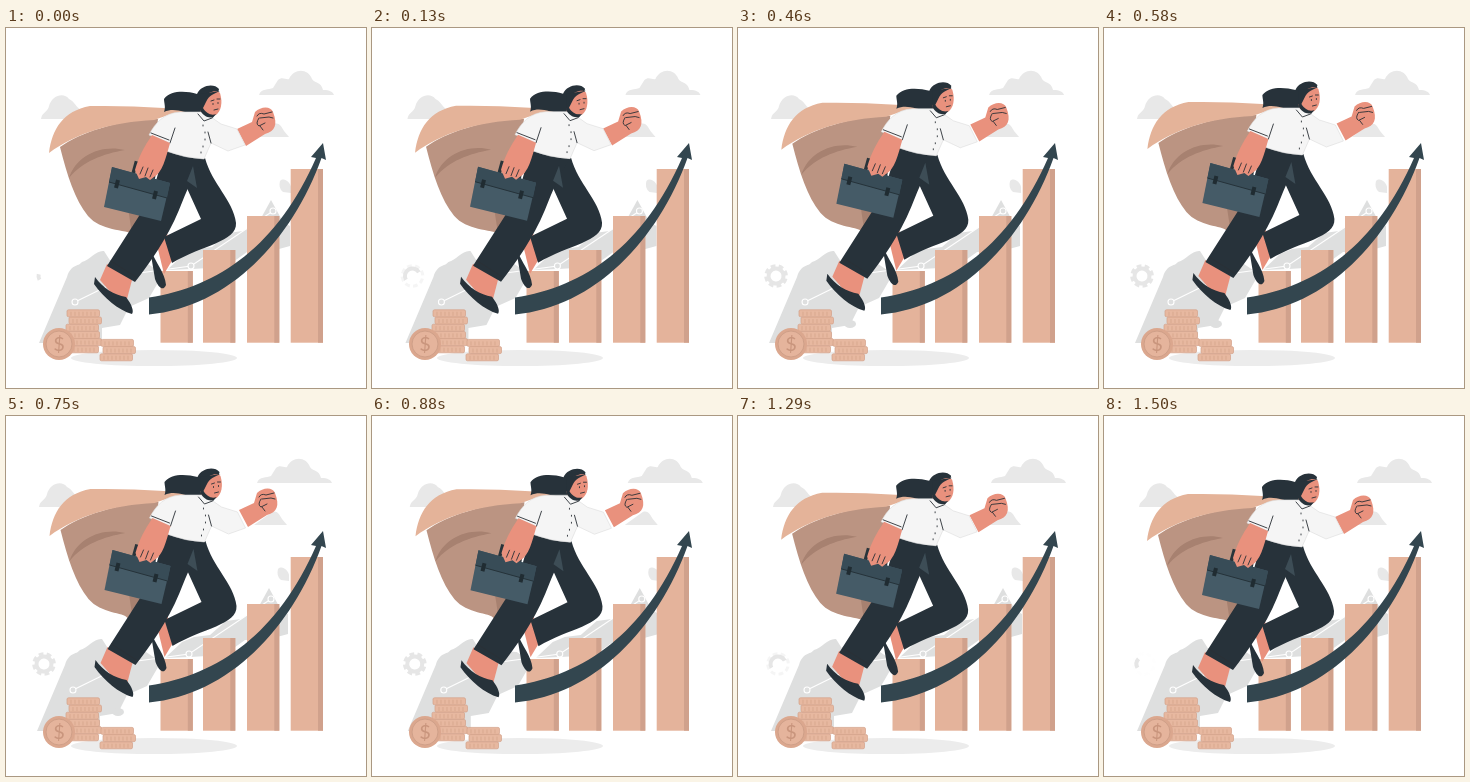
Write an HTML page that moves like this. It is 360 by 360 pixels and loops after 1540 ms.

```html
<!DOCTYPE html>
<html lang="en">
<head>
<meta charset="utf-8">
<style>
html, body { margin: 0; height: 100%; overflow: hidden; background: #fff; }
svg { display: block; width: 100vw; height: 100vh; }
.cloud { fill: #e8e8e8; }
.hill { fill: #dedfdf; }
.dark { fill: #27323a; }
.skin { fill: #e9917d; }
.line { fill: none; stroke: #2b3036; stroke-width: .9; stroke-linecap: round; stroke-linejoin: round; }
</style>
</head>
<body>
<svg viewBox="0 0 360 360">
  <g id="backdrop">
    <g class="cloud">
      <path d="M253 67C255 60 263 62 267 60L272 52C276 48 280 52 283 51C288 40 302 40 306 51C309 56 315 53 317 62C324 62 327 64 328 67Z"/>
      <path d="M35 91C36 84 42 84 43 78C46 67 58 64 63 71C68 73 69 78 75 82L68 91Z"/>
      <path d="M250 109L268 96C274 94 276 100 278 103L283 109Z"/>
      <path d="M274 153C278 149 284 154 285 159V165L277 164Q272 160 274 153Z"/>
    </g>
    <g class="hill">
      <path d="M33 315L61 249C65 236 72 239 76 234C84 232 90 222 98 223L105 234L142 236L157 246L143 270L123 279L114 297L96 300V315Z"/>
      <path d="M161 242L178 226L190 221L206 219L222 205L237 203L254 192L265 172L277 194L284 198V218L262 224H241L220 239L186 241Z"/>
      <ellipse id="blob" cx="114" cy="296" rx="6" ry="4"/>
    </g>
    <g fill="none" stroke="#e6e6e6" transform="rotate(150 40 248)">
      <circle id="ring" cx="40" cy="248" r="7.5" stroke-width="4" pathLength="100"/>
      <circle id="teeth" cx="40" cy="248" r="10.3" stroke-width="3" pathLength="80" stroke-dasharray="6 4"/>
    </g>
    <g fill="#dedfdf" stroke="#fff" stroke-width="1.1">
      <path d="M69 274L126 246L185 238L267 183" fill="none"/>
      <circle cx="69" cy="274" r="3"/><circle cx="185" cy="238" r="3"/><circle cx="267" cy="183" r="3"/>
    </g>
  </g>
  <ellipse cx="148" cy="330" rx="83" ry="8" fill="#ececec"/>
  <g id="bars"></g>
  <g id="coins" stroke="#d3a189" stroke-width=".7" fill="#e7b8a0"></g>
  <circle cx="53" cy="316" r="16" fill="#dba78e"/>
  <circle cx="53" cy="316" r="13" fill="#e5b49c" stroke="#cf9f88"/>
  <text x="53" y="323" text-anchor="middle" font-family="Lato, sans-serif" font-size="20" fill="#c9957d">$</text>

  <g id="figure">
    <path id="cape" fill="#bb9482"/>
    <path fill="#a78170" d="M63 150C70 127 96 116 119 122C97 126 77 133 63 150Z"/>
    <path fill="#a78170" d="M122 180L137 182L131 204L126 206Z"/>
    <path fill="#e4b399" d="M200 84C164 79 122 78 84 78C57 83 46 101 43 125C70 105 106 94 148 92L168 85Z"/>

    <path class="skin" d="M150 213L161 205L167 231L158 246Z"/>
    <path class="dark" d="M144 221C150 235 159 245 160 257C157 264 152 259 149 251Z"/>
    <path class="dark" d="M175 145L199 130C206 156 227 172 230 195C231 214 196 217 166 235L158 209L195 191L180 158Z"/>
    <path class="skin" d="M101 236L126 252L121 271L107 267L94 252Z"/>
    <path class="dark" d="M89 249C97 260 108 267 120 269C126 277 128 283 126 286C112 282 98 270 88 256Z"/>
    <path class="dark" d="M159 122L198 131C188 145 181 162 173 182C161 211 143 236 129 254L101 238L133 188L147 163Z"/>
    <path fill="#3d4d56" d="M187 138L191 160L181 153Z"/>
    <path class="line" stroke="#56636a" d="M105 233L130 249"/>

    <path class="dark" d="M213 61C208 55 195 57 191 66C180 63 165 62 158 71C158 75 160 79 158 84C170 78 180 87 193 85L204 91C207 91 208 89 208 85Z"/>
    <path class="skin" d="M194 80L203 83L207 94L196 90Z"/>
    <g id="punch">
      <path class="skin" d="M231 101L246 94L249 84C255 78 265 78 267 84C272 97 269 103 259 106L240 118Z"/>
      <path class="line" d="M251 88Q253 84 258 86L266 84M254 90L263 89L267 90M253 90Q249 96 253 98L259 95M254 98L257 102"/>
    </g>
    <path d="M174 84C158 85 149 95 143 107L164 115L160 123Q178 130 198 131L205 115L222 123L239 117L231 101L215 96L205 89L196 84Z" fill="#f5f5f5" stroke="#dcdcdc" stroke-width=".6"/>
    <path class="line" d="M164 115L169 100M145 105L163 112M205 115L202 104M192 86L198 93L206 90"/>
    <path class="line" d="M197 97V98M199 104V105M199 111V112M197 118V119M195 124V125" stroke-width="1.6"/>
    <path class="skin" d="M197 69C202 64 211 61 214 65C217 75 215 83 210 87C204 88 198 85 196 79Z"/>
    <path class="dark" d="M214 63C208 66 203 67 200 74L197 80C200 85 205 88 210 86C207 92 198 90 194 82L194 66Z"/>
    <path class="line" d="M205 73L208 72M211 71L214 71M207 75.5V76.5M212 74.5V75.5M208 82L212 81"/>

    <path d="M127 146L130 135L149 140L147 152" fill="none" stroke="#29343a" stroke-width="3.5"/>
    <path fill="#455b67" d="M106 139L164 155L155 193L98 179Z"/>
    <path fill="#384c57" d="M106 139L164 155L161 170L103 154Z"/>
    <path d="M103 154L161 170" stroke="#253239"/>
    <path d="M112 152L110 160M150 163L148 171" stroke="#202c32" stroke-width="4"/>
    <path class="skin" d="M146 107L164 115C160 130 156 145 148 149L144 152L140 149L133 151L129 142C133 128 138 119 146 107Z"/>
    <path class="line" d="M134 146L137 139M139 148L142 140M144 149L147 142" stroke="#b4665a"/>
  </g>
  <path fill="#33464f" d="M143 269.5C213 259 272 217 310 130L305 129L317 115L320 132L315.5 130C286 212 223 279 143 286.5Z"/>
</svg>
<script>
const $ = id => document.getElementById(id);
const PERIOD = 1540, FRAMES = 37;

const rect = (x, y, w, h, extra) => `<rect x="${x}" y="${y}" width="${w}" height="${h}" ${extra}/>`;

$('bars').innerHTML = [[154.5, 243], [197, 222], [241, 188], [284.7, 141]].map(([x, y]) =>
  rect(x, y, 32.3, 314.7 - y, 'fill="#e4b39b"') + rect(x + 27.3, y, 5, 314.7 - y, 'fill="#d0a18c"')).join('');

function coinStack(x, bottom, count) {
  let out = '';
  for (let i = 0; i < count; i++) {
    const left = x + [0, 3, 1][i % 3], y = bottom - 7.2 * (i + 1);
    out += rect(left, y, 32.5, 7, 'rx="1.5"');
    for (let k = 4; k < 31; k += 4) out += `<path d="M${left + k} ${y + 2}v4"/>`;
  }
  return out;
}
$('coins').innerHTML = coinStack(60, 325, 6) + coinStack(94, 333, 3);

// Linear interpolation through [time, value] pairs
function track(keys, t) {
  const i = keys.findIndex(k => k[0] > t);
  const [t0, a] = keys[i - 1], [t1, b] = keys[i];
  return a + (b - a) * (t - t0) / (t1 - t0);
}
const drift = [[0, 0], [290, 1], [460, -2], [750, -2], [880, 3], [1130, 0], [PERIOD, 0]];
const gear = [[0, .12], [290, 1], [880, 1], [1130, .75], [1500, .2], [PERIOD, .12]];

function draw(now) {
  const t = Math.floor(now % PERIOD / PERIOD * FRAMES) / FRAMES * PERIOD;
  const lift = (1 - Math.cos(2 * Math.PI * t / PERIOD)) / 2;
  $('figure').setAttribute('transform', `translate(${.5 * lift} ${-5 * lift})`);
  $('punch').setAttribute('transform', `translate(${1.5 * lift} ${-2 * lift})`);
  $('cape').setAttribute('d', `M54 119C74 105 110 92 152 91L140 180L${131 - 10 * lift} 207C117 201 95 203 82 188C69 172 61 147 54 119Z`);
  $('backdrop').setAttribute('transform', `translate(${track(drift, t)} 0)`);
  const shown = track(gear, t);
  $('ring').setAttribute('stroke-dasharray', `${100 * shown} 100`);
  $('teeth').setAttribute('opacity', Math.max(0, shown * 1.2 - .2));
  $('blob').setAttribute('opacity', t > 400 && t < 800 ? 1 : 0);
  requestAnimationFrame(draw);
}
draw(performance.now());
</script>
</body>
</html>
```
